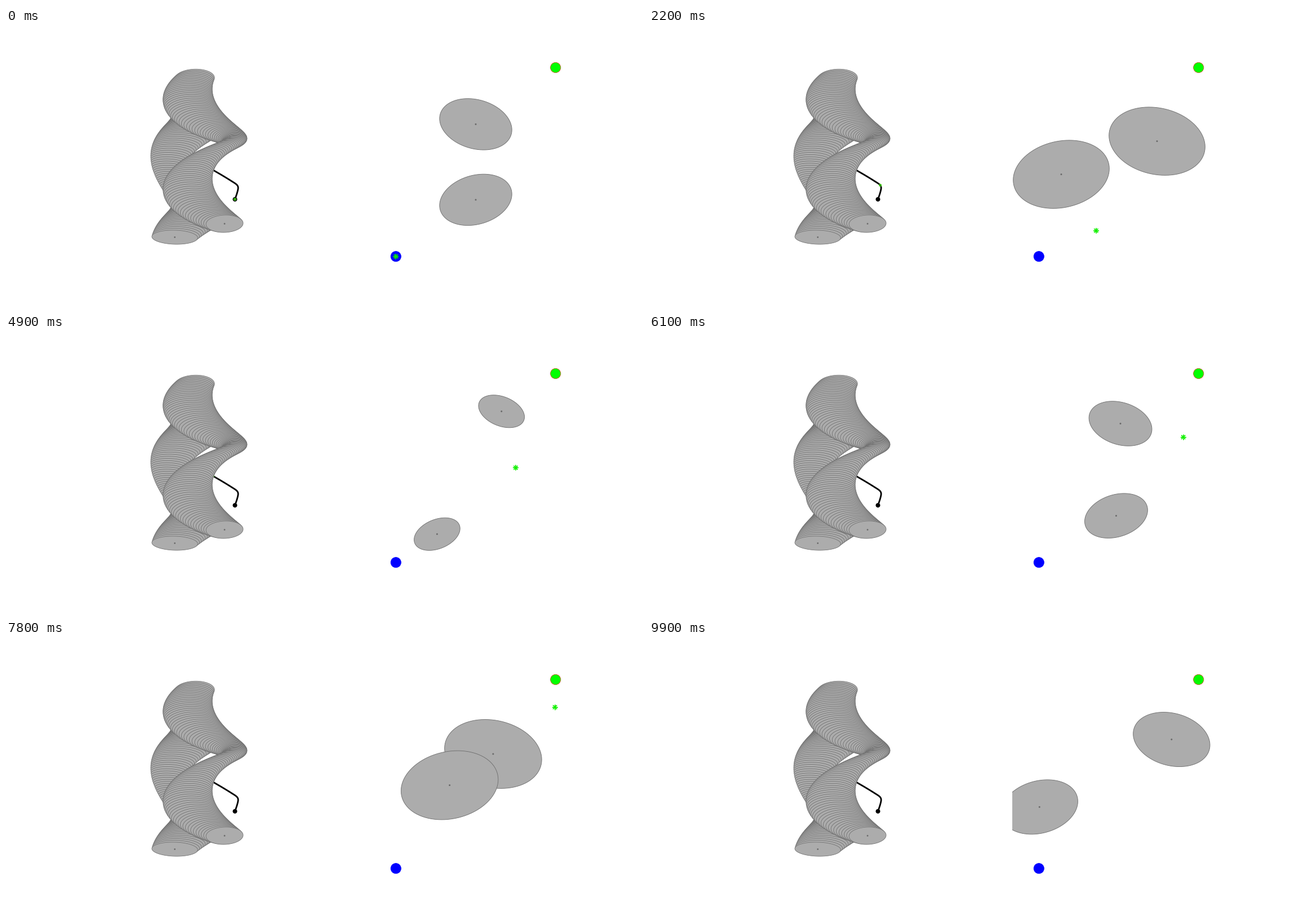
A matplotlib script that plays this animation: 1131 px wide and 495 px high, repeating every 10 s.

```python
import numpy as np
import matplotlib.pyplot as plt
from matplotlib.animation import FuncAnimation
from matplotlib.collections import PolyCollection
from matplotlib.patches import Circle, Polygon, Rectangle

W, H, DPI = 1131, 495, 64
FRAMES, INTERVAL = 100, 100
FILL, EDGE, DOT = "#acacac", "#6e6e6e", "#6a6a6a"
GREEN, DARK_GREEN = "#10f000", "#40d010"


def px(width):
    """Line width in pixels to points."""
    return width * 72 / DPI


def spline(xk, yk, x):
    """Natural cubic spline through the knots."""
    xk, yk = np.asarray(xk, float), np.asarray(yk, float)
    n, h, d = len(xk), np.diff(xk), np.diff(yk) / np.diff(xk)
    m, r = np.eye(n), np.zeros(n)
    for i in range(1, n - 1):
        m[i, i - 1:i + 2] = h[i - 1], 2 * (h[i - 1] + h[i]), h[i]
        r[i] = 6 * (d[i] - d[i - 1])
    c = np.linalg.solve(m, r)
    i = np.clip(np.searchsorted(xk, x, side="right") - 1, 0, n - 2)
    t = x - xk[i]
    slope = d[i] - h[i] * (2 * c[i] + c[i + 1]) / 6
    return yk[i] + slope * t + c[i] / 2 * t**2 + (c[i + 1] - c[i]) / (6 * h[i]) * t**3


# Motion: phase of the obstacles and position of the robot at each step
steps = np.arange(FRAMES)
phase = spline([0, 14, 22, 37, 61, 78, 99],
               [0, 1.266, 2.026, 3.534, 5.923, 7.501, 9.255], steps)
robot_x = np.minimum(7, spline([0, 14, 22, 28, 37, 61, 66, 78, 88, 99],
                               [1, 2.347, 3.15, 3.70, 4.45, 6.427, 6.70, 6.977, 6.997, 7],
                               steps))
robot_y = spline([0, 14, 22, 28, 37, 61, 78, 88, 99],
                 [1, 1.741, 2.366, 3.117, 4.345, 7.634, 9.539, 10.27, 11], steps)


def flat(x, y):
    """Plan view: 8 by 12 units."""
    return 645 + 47.25 * x, 440.4 - 33.63 * y


def solid(x, y, t):
    """Space-time view, time runs upwards."""
    return (406.5 + 15.95 * (x - 1) - 22.1 * (y - 1),
            305 + 8.5 * (x - 1) + 6 * (y - 1) - 25.4 * t)


def center(which, t):
    if which == 0:
        return 5 - np.cos(t), 8 - np.sin(t)
    return 2.5 + 1.5 * np.cos(t), 4 + 1.5 * np.sin(t)


ANGLE = np.linspace(0, 2 * np.pi, 90, endpoint=False)


def outline(which, t):
    """Ellipse tilted by 45 degrees that swells with the phase."""
    cx, cy = center(which, t)
    u = (1.5 + 0.5 * np.sin(t)) * np.cos(ANGLE) / np.sqrt(2)
    v = (1.2 + 0.5 * np.sin(t)) * np.sin(ANGLE) / np.sqrt(2)
    tilt = -1 if which == 0 else 1
    return cx + u - tilt * v, cy + tilt * u + v


fig = plt.figure(figsize=(W / DPI, H / DPI), dpi=DPI, facecolor="white")
ax = fig.add_axes([0, 0, 1, 1])
ax.set_xlim(0, W)
ax.set_ylim(H, 0)
ax.axis("off")


def dot(xy, r, color, z, edge="none"):
    return ax.add_patch(Circle(xy, r, fc=color, ec=edge, lw=px(0.8), zorder=z))


# Left: path, robot and the two tubes
ax.plot(*solid(robot_x, robot_y, phase), color="black", lw=px(2.8), zorder=1,
        solid_joinstyle="round")
dot(solid(1, 1, 0), 4, "black", 2)
marker = dot((0, 0), 2.5, DARK_GREEN, 3)
core = dot((0, 0), 0.9, "#104000", 4)

for which in (0, 1):
    discs = [np.column_stack(solid(*outline(which, t), t)) for t in phase[::-1]]
    ax.add_collection(PolyCollection(discs, facecolors=FILL, edgecolors=EDGE,
                                     linewidths=px(0.8), zorder=5 + which))
    dot(solid(*center(which, 0), 0), 1.4, DOT, 7)

# Right: obstacles, start, goal and robot
window = Rectangle((645, 37), 378.5, 403.5, transform=ax.transData)
ellipses, hubs = [], []
for which in (0, 1):
    shape = Polygon(np.zeros((3, 2)), closed=True, fc=FILL, ec=EDGE, lw=px(0.9),
                    zorder=10 + 2 * which)
    ax.add_patch(shape)
    shape.set_clip_path(window)
    ellipses.append(shape)
    hubs.append(dot((0, 0), 1.5, DOT, 11 + 2 * which))

dot(flat(1, 1), 9.1, "#0000ff", 15, "#0000ff")
dot(flat(7, 11), 9.1, "#00ff00", 15, "#d05020")
spokes = [ax.plot([], [], color=GREEN, lw=px(1.7), zorder=16,
                  solid_capstyle="butt")[0] for _ in range(4)]


def draw(k):
    t = phase[k]
    for which in (0, 1):
        ellipses[which].set_xy(np.column_stack(flat(*outline(which, t))))
        hubs[which].center = flat(*center(which, t))
    x, y = flat(robot_x[k], robot_y[k])
    for i, line in enumerate(spokes):
        dx, dy = 5 * np.cos(i * np.pi / 4), 5 * np.sin(i * np.pi / 4)
        line.set_data([x - dx, x + dx], [y - dy, y + dy])
    marker.center = core.center = solid(robot_x[k], robot_y[k], t)
    return [*ellipses, *hubs, *spokes, marker, core]


anim = FuncAnimation(fig, draw, frames=FRAMES, interval=INTERVAL, repeat=True,
                     repeat_delay=0, init_func=lambda: draw(0), blit=False)
plt.show()
```
